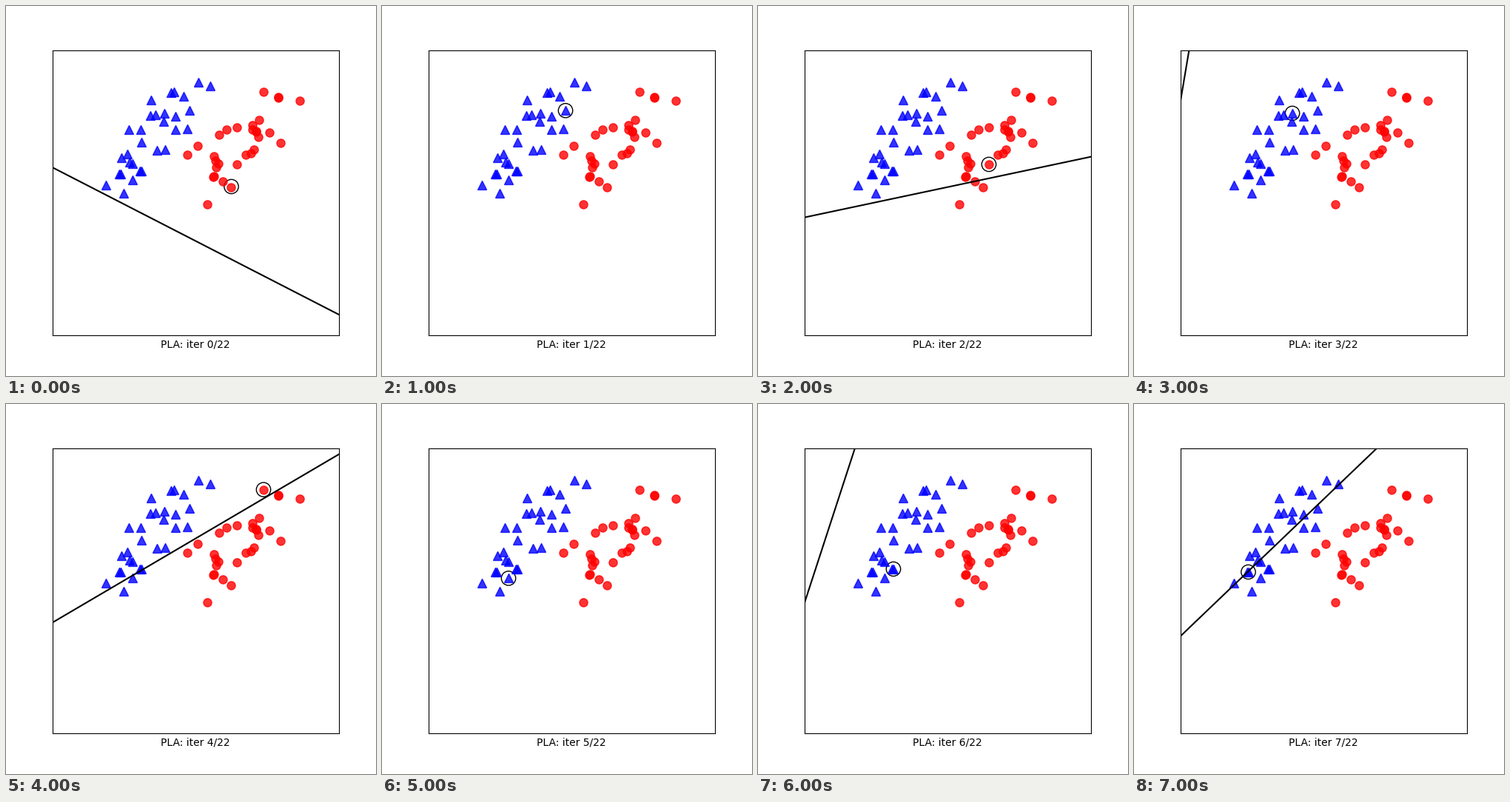
Recreate the animation shown at these times as a matplotlib script. Size 500 by 500 pixels, loop 8000 ms.

```python
import numpy as np
import matplotlib.pyplot as plt
from matplotlib.animation import FuncAnimation

TOTAL_ITERS = 22
SHOWN = 8


def to_data(points):
    """Convert stage pixels (y down) to axis units, with x in 0..6 and y in -2..4."""
    p = np.array(points, dtype=float)
    return np.column_stack(((p[:, 0] - 62.5) * 6 / 387.5,
                            4 - (p[:, 1] - 60) * 6 / 385))


blue = to_data([
    (135, 242), (159, 253), (153, 227), (155, 227), (171, 235), (181, 223),
    (183, 223), (156, 205), (164, 200), (167, 211), (171, 213), (183, 184),
    (166, 167), (182, 167), (204, 195), (215, 194), (195, 148), (202, 147),
    (196, 127), (213, 156), (214, 145), (229, 149), (229, 167), (245, 166),
    (248, 141), (240, 122), (223, 117), (227, 116), (260, 103), (276, 108)])
red = to_data([
    (348, 116), (368, 123), (368, 124), (397, 128), (342, 154), (333, 161),
    (333, 167), (338, 169), (338, 170), (341, 177), (356, 171), (371, 185),
    (312, 164), (298, 167), (288, 174), (259, 189), (245, 201), (281, 203),
    (283, 209), (287, 213), (284, 218), (280, 231), (281, 230), (293, 237),
    (304, 245), (272, 268), (312, 214), (324, 201), (331, 199), (335, 194)])

# Misclassified point picked in each iteration and its label (+1 blue, -1 red)
picks = to_data([(304.5, 244), (248, 141.3), (312, 214), (214, 145),
                 (348, 115.7), (171, 235.5), (183, 223), (154.5, 227)])
labels = [-1, 1, -1, 1, -1, 1, 1, 1]

# Perceptron rule: w <- w + y * (1, x1, x2)
weights = [np.array([-1.124, 0.378, 0.731])]
for label, (px, py) in zip(labels, picks):
    weights.append(weights[-1] + label * np.array([1, px, py]))

plt.rcParams["font.family"] = "DejaVu Sans"
fig, ax = plt.subplots(figsize=(5, 5), dpi=100)
fig.subplots_adjust(left=0.125, right=0.9, bottom=0.11, top=0.88)
ax.plot(blue[:, 0], blue[:, 1], "b^", markersize=8, alpha=0.8)
ax.plot(red[:, 0], red[:, 1], "ro", markersize=8, alpha=0.8)
boundary, = ax.plot([], [], "k", lw=1.5)
ring = plt.Circle((0, 0), 0.15, color="k", fill=False)
ax.add_artist(ring)
ax.axis([0, 6, -2, 4])
ax.set_xticks([])
ax.set_yticks([])

ends = np.array([-100, 100])


def update(i):
    bias, w1, w2 = weights[i]
    boundary.set_data(ends, -(bias + w1 * ends) / w2)
    ring.center = tuple(picks[i])
    ax.set_xlabel(f"PLA: iter {i}/{TOTAL_ITERS}")
    return boundary, ring


anim = FuncAnimation(fig, update, frames=SHOWN, interval=1000,
                     repeat=True, repeat_delay=0, blit=False)
plt.show()
```
